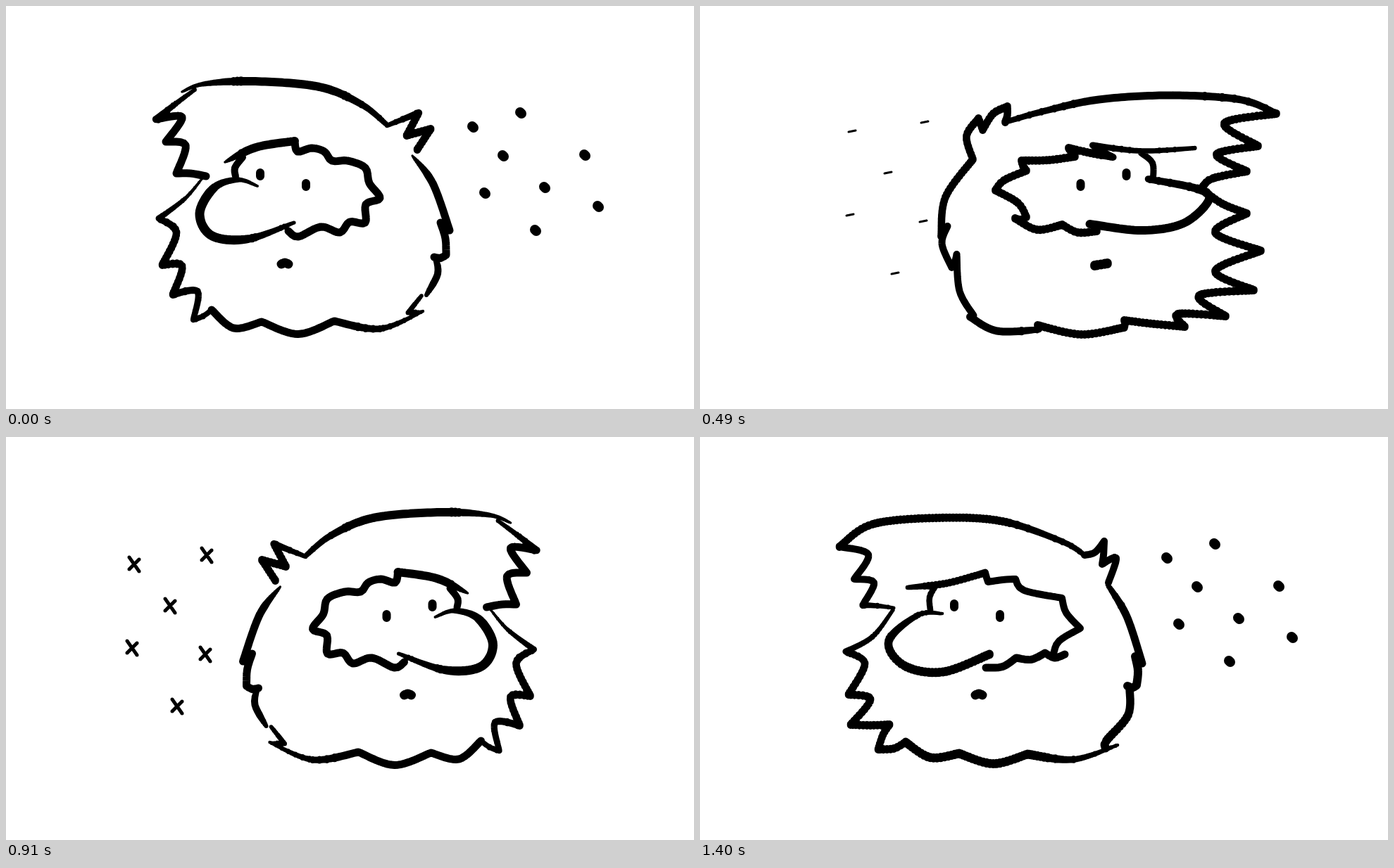
An HTML page that plays this animation: 977x573 px, repeating every 1.47 s.

```html
<!DOCTYPE html>
<html lang="en">
<head>
<meta charset="utf-8">
<title>Turning head</title>
<style>
  html, body { margin: 0; width: 100%; height: 100%; overflow: hidden; background: #fff; }
  svg { display: block; width: 100vw; height: 100vh; }
</style>
</head>
<body>
<svg viewBox="0 0 977 573" preserveAspectRatio="none">
  <path id="head"/>
  <path id="marks"/>
</svg>
<script>
const STEP = 70;
const AXIS = 966.5;   // the two facings mirror each other: x -> AXIS - x
const FLOOR = 467;    // vertical scaling keeps the chin in place

const parse = s => s.split(' ').map(p => p.split(',').map(Number));

// Catmull-Rom through the points
function smooth(points) {
  const out = [];
  for (let i = 0; i < points.length - 1; i++) {
    const b = points[i], c = points[i + 1];
    const a = points[i - 1] || b, d = points[i + 2] || c;
    const n = Math.max(2, Math.ceil(Math.hypot(c[0] - b[0], c[1] - b[1]) / 5));
    for (let k = 0; k <= n; k++) {
      const t = k / n;
      out.push([0, 1].map(j => b[j] + t / 2 * (c[j] - a[j] +
        t * (2 * a[j] - 5 * b[j] + 4 * c[j] - d[j] + t * (3 * (b[j] - c[j]) + d[j] - a[j])))));
    }
  }
  return out;
}

// Fur: every other point is a sharp tip, those between are round
function fur(points) {
  const out = [];
  for (let i = 0; i < points.length - 1; i += 2) out.push(...smooth(points.slice(i, i + 3)));
  return out;
}

// Sharp points joined by bows of equal depth
const bows = depth => points => points.slice(1).flatMap((b, i) => {
  const a = points[i], dx = b[0] - a[0], dy = b[1] - a[1], l = Math.hypot(dx, dy);
  const mid = [(a[0] + b[0]) / 2 + dy / l * depth, (a[1] + b[1]) / 2 - dx / l * depth];
  return smooth([a, mid, b]);
});

// Outline of a round brush; its pressure eases in from "start" and out to "end"
function brush(points, weight, start = 1, end = 1) {
  const f = v => v.toFixed(1), last = points.length - 1;
  let d = '', p = null;
  points.forEach(([x, y], i) => {
    const u = i / last, ramp = (from, t) => from + (1 - from) * Math.min(1, t / .3);
    const r = weight / 2 * ramp(start, u) * ramp(end, 1 - u), R = f(r);
    d += `M${f(x - r)} ${f(y)}a${R} ${R} 0 1 0 ${f(2 * r)} 0a${R} ${R} 0 1 0 ${f(-2 * r)} 0z`;
    if (p) {
      const l = Math.hypot(x - p.x, y - p.y) || 1;
      const nx = (p.y - y) / l, ny = (x - p.x) / l;
      d += `M${f(p.x + nx * p.r)} ${f(p.y + ny * p.r)}L${f(x + nx * r)} ${f(y + ny * r)}` +
        ` ${f(x - nx * r)} ${f(y - ny * r)} ${f(p.x - nx * p.r)} ${f(p.y - ny * p.r)}z`;
    }
    p = { x, y, r };
  });
  return d;
}

const EYES = [[smooth, '361,237 361,242', 12], [smooth, '426,252 426,257', 12]];
const MOUTH = [smooth, '391,367 396,365 401,367', 13];

// Each stroke: curve, key points, weight, pressure at start and end
const POSES = {
  calm: [
    ...EYES, MOUTH,
    [smooth, '250,122 280,111 350,107 445,115 505,140 541,169', 12, .3, .6],
    [bows(0), '541,170 586,152 569,184 603,175 584,204', 10.5, .6],
    [smooth, '577,213 606,252 630,319', 11, .3],
    [bows(3), '617,308 625,354 608,357', 11],
    [smooth, '610,358 613,381 597,411', 10, .8, .6],
    [bows(0), '590,412 571,436 592,434', 7, .8, .3],
    [bows(18), '592,434 466,448 363,449 292,432', 11, .4],
    [fur, '292,432 280,441 266,446 272,406 237,410 250,370 222,368 242,322 217,302 254,274 278,246', 10.5, .7, .3],
    [fur, '268,119 241,139 213,161 250,158 227,193 255,198 242,238 262,238 284,242', 11, .5],
    [smooth, '311,222 355,201 410,192', 12, .3],
    [smooth, '410,192 414,207 434,202 452,207 463,220 485,220 510,230 516,252 531,273 511,282 510,308 488,307 474,322 447,314 415,328 401,320', 11],
    [smooth, '336,215 325,230 326,242', 10],
    [smooth, '357,256 330,247 296,258 275,295 293,327 345,331 409,308', 13, .3, .4]
  ],
  settle: [
    ...EYES, MOUTH,
    [smooth, '198,156 245,124 340,115 430,120 515,149 546,168', 10.5, 1, .7],
    [fur, '546,168 561,164 574,148 573,168 571,181 591,172 580,207', 10],
    [smooth, '579,210 606,255 628,322', 11, .6],
    [bows(3), '618,312 620,353 607,354', 12],
    [smooth, '610,356 608,395 577,432 576,442', 11.5],
    [bows(14), '593,438 465,451 368,450 292,434', 11.5, .4],
    [fur, '292,434 275,443 253,444 260,423 269,409 242,410 214,409 242,373 211,366 234,322 207,305 245,284 274,246', 10.5, 1, .5],
    [fur, '198,156 239,167 219,202 247,207 231,239 252,240 275,243', 10, 1, .5],
    [smooth, '295,214 350,208 405,193', 9.5, .7],
    [fur, '405,193 407,200 409,206 430,203 448,202 460,218 514,229 520,250 540,272 510,290 502,308', 10],
    [bows(6), '518,309 490,307 449,314 406,328', 11],
    [smooth, '334,212 326,228 327,246', 8.5],
    [smooth, '344,251 310,253 268,290 290,325 345,334 411,309', 11.5, .4]
  ],
  swing: [
    ...EYES,
    [smooth, '388,366 406,369', 12.5],
    [smooth, '148,153 200,133 300,127 400,133 476,149 533,165', 11, .9, .7],
    [fur, '533,165 530,155 530,143 550,153 565,176 568,168 571,160 588,185 579,218 618,272 624,327', 10.5],
    [fur, '615,313 623,338 609,372 604,362 602,353 598,405 578,440', 10],
    [smooth, '583,442 545,462 485,460', 11, 1, .8],
    [fur, '487,454 425,467 364,457 363,452 364,447 322,452 278,456 288,438 220,441 258,412 180,404 235,377 170,348 235,322 190,295 225,281 253,261', 10.5],
    [fur, '148,153 222,167 174,199 233,211 190,235 238,245 252,256', 10.5],
    [smooth, '330,246 260,260 244,276 280,309 340,319 413,310', 12, .8],
    [fur, '403,320 430,322 452,311 488,318 519,302 511,304 503,300 515,280 547,262 535,248 503,234 508,227 510,220 470,219 434,214 440,207 443,202 412,209 380,215 395,207 409,198 340,206 264,202', 10.5, 1, .6],
    [smooth, '340,209 324,223 323,245', 9]
  ],
  smear: [
    [smooth, '230,156 265,143 385,133 520,144 615,167 648,195', 10.5],
    [smooth, '645,197 674,236', 11],
    [smooth, '670,237 707,300 688,345', 9],
    [smooth, '688,347 676,369 651,384', 10.5, .8],
    [smooth, '653,387 658,403 625,440 595,456 555,453 471,462', 12],
    [smooth, '464,454 390,470 336,473', 9.5],
    [fur, '230,157 298,177 236,206 327,235 244,277 303,312 244,352 285,351 325,349', 10, 1, .3],
    [smooth, '308,351 319,363 252,391', 9, .5],
    [fur, '252,391 327,417 276,446 358,452 336,473', 10],
    [smooth, '425,250 377,235 470,215 600,201 637,222 605,243 553,247', 9.5, .3, .8],
    [smooth, '632,238 661,260 630,288', 9],
    [smooth, '455,241 485,244 512,245', 9],
    [smooth, '462,260 400,268 386,290 440,305 530,310 622,290 605,270 541,272', 12.5, .7, .2],
    [smooth, '489,374 560,362 634,353', 10, .8, .2]
  ]
};

const DOTS = parse('663,172 731,152 706,213 822,212 680,266 765,258 841,285 752,319');
const CROSSES = parse('182,181 285,168 233,240 179,300 283,309 243,383');
const CHIPS = parse('611,142 711,196 685,248 742,272');
const SPECKS = parse('267,166 383,149 248,278 326,341');

const each = (list, fn) => list.map(fn).join('');
const dash = (dx, dy, rx, ry, w) => ([x, y]) =>
  brush([[x + dx - rx, y + dy - ry], [x + dx + rx, y + dy + ry]], w);
const cross = (k, dx = 0) => p =>
  dash(dx, 0, 7 * k, 10 * k, 5 * k)(p) + dash(dx, 0, -7 * k, 7 * k, 5 * k)(p);

const heads = {};
for (const name in POSES) {
  heads[name] = each(POSES[name], ([curve, points, ...pen]) => brush(curve(parse(points)), ...pen));
}
const marks = {
  none: '',
  dots: each(DOTS, dash(0, 0, 1, 1, 14)),
  smallDots: each(DOTS, dash(0, 0, 1, 1, 11)),
  dashes: each(DOTS, dash(-39, -7, 5, 1, 3.5)),
  crosses: each(CROSSES, cross(1)),
  smallCrosses: each(CROSSES, cross(.7, 8)),
  ticks: each(CROSSES, dash(34, -3, 5, -1, 3)),
  chips: each(CHIPS, dash(0, 0, 4, 0, 2.5)),
  specks: each(SPECKS, dash(0, 0, 2, -1, 3))
};

// pose, facing (1 left, -1 right), marks, shift towards the back, height
const hold = (side, kind) => [
  ['settle', side, kind], ['calm', side, kind], ['calm', side, kind, 0, 1.011]
];
const [settleL, calmL, tallL] = hold(1, 'dots');
const [settleR, calmR, tallR] = hold(-1, 'crosses');
const TIMELINE = [
  calmL, tallL, settleL, calmL,
  ['swing', 1, 'dashes', 55],
  ['smear', 1, 'chips'],
  ['swing', -1, 'none', 30],
  ['swing', -1, 'ticks'],
  ['settle', -1, 'smallCrosses', -12],
  settleR, calmR, tallR, settleR, calmR,
  ['swing', -1, 'smallCrosses', 55],
  ['smear', -1, 'specks'],
  ['smear', -1, 'none', 30],
  ['swing', 1, 'none', 30],
  ['swing', 1, 'dashes'],
  ['calm', 1, 'smallDots'],
  settleL
];

const headEl = document.getElementById('head');
const marksEl = document.getElementById('marks');
let shown = -1;

function draw(now) {
  const i = Math.floor(now / STEP) % TIMELINE.length;
  if (i !== shown) {
    shown = i;
    const [pose, side, kind, shift = 0, tall = 1] = TIMELINE[i];
    const x = side > 0 ? shift : AXIS - shift;
    headEl.setAttribute('d', heads[pose]);
    headEl.setAttribute('transform', `matrix(${side} 0 0 ${tall} ${x} ${FLOOR * (1 - tall)})`);
    marksEl.setAttribute('d', marks[kind]);
  }
  requestAnimationFrame(draw);
}
draw(0);
</script>
</body>
</html>
```
